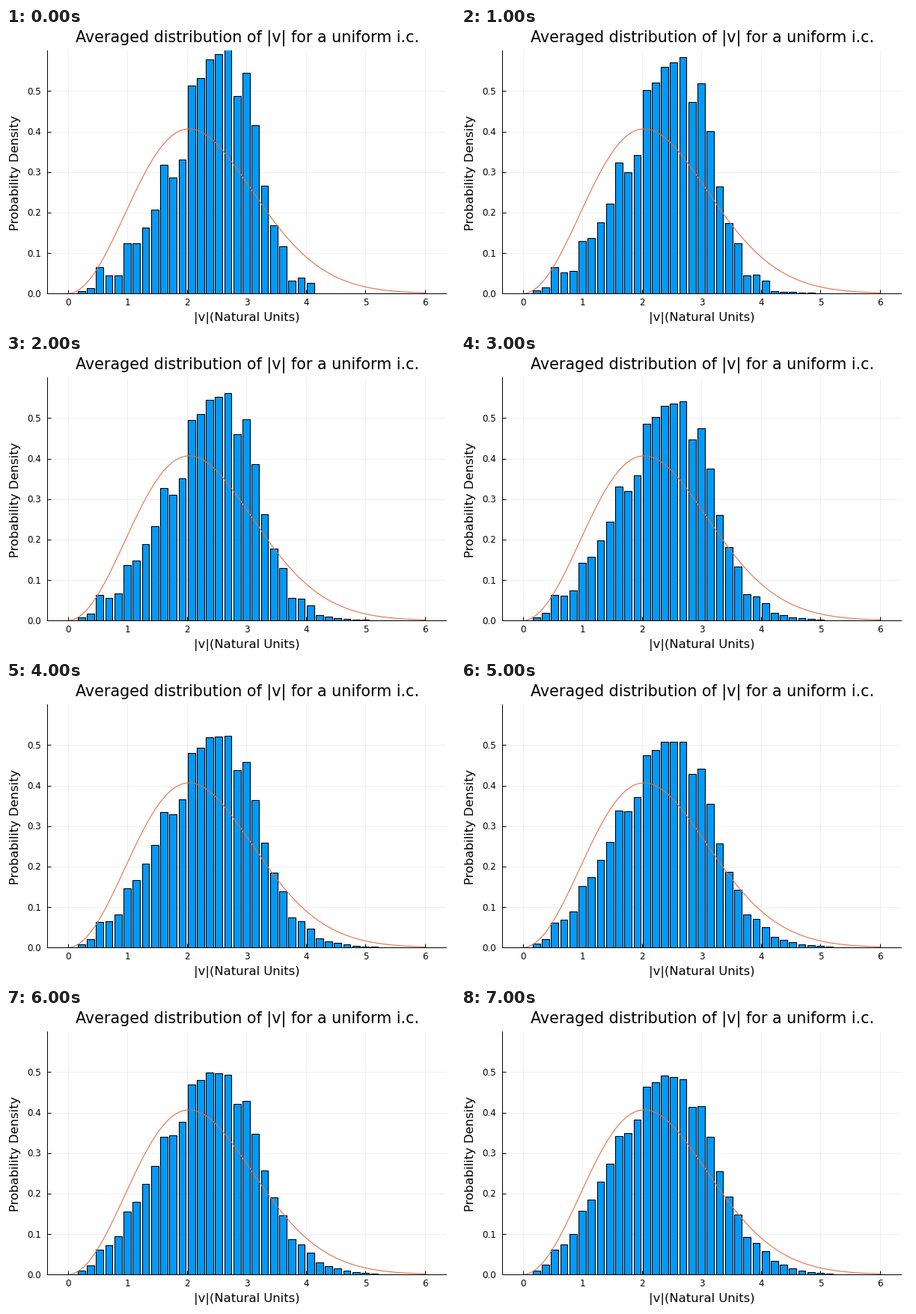
Write a matplotlib script that moves like this. It is 600 px wide and 400 px high and loops after 8000 ms.

```python
import numpy as np
import matplotlib.pyplot as plt
from matplotlib.animation import FuncAnimation

W, H, DPI = 600, 400, 100
BINS = 39
STEP = 6 / BINS
X0, X_UNIT = 82.55, 79.5     # pixel of v = 0, pixels per unit of v
Y0, Y_UNIT = 355.2, 541.5    # pixel of density 0, pixels per unit
LEFT, RIGHT, TOP = 55.1, 587.9, 30.3

# Particles per bin at the start, and the density of a single particle.
COUNTS = [0, 1, 2, 10, 7, 7, 19, 19, 25, 32, 49, 44, 51, 79,
          82, 89, 91, 94, 75, 84, 64, 41, 26, 18, 5, 6, 4]
PER_COUNT = 0.0065
RATE = 0.13                  # relaxation per second


def pt(px):
    return px * 72 / DPI


def maxwell(v, a=1.443):
    return np.sqrt(2 / np.pi) * v**2 / a**3 * np.exp(-v**2 / (2 * a**2))


centers = (np.arange(BINS) + 0.5) * STEP
start = np.pad(COUNTS, (0, BINS - len(COUNTS))) * PER_COUNT
relaxed = 0.2122 * centers**2 * np.exp(-0.155 * centers**2 - 0.0045 * centers**4)


def heights(t):
    return relaxed + (start - relaxed) * np.exp(-RATE * t)


fig = plt.figure(figsize=(W / DPI, H / DPI), dpi=DPI, facecolor="white")
ax = fig.add_axes([LEFT / W, 1 - Y0 / H, (RIGHT - LEFT) / W, (Y0 - TOP) / H])
ax.set_xlim((LEFT - X0) / X_UNIT, (RIGHT - X0) / X_UNIT)
ax.set_ylim(0, (Y0 - TOP) / Y_UNIT)
ax.set_axisbelow(True)
ax.spines[["top", "right"]].set_visible(False)
ax.spines[["left", "bottom"]].set_linewidth(pt(1))

x_ticks = np.arange(7)
y_ticks = np.arange(6) / 10
ax.set_xticks(x_ticks)
ax.set_yticks(y_ticks)
ax.tick_params(direction="in", length=pt(5), width=pt(1),
               labelbottom=False, labelleft=False)
ax.grid(color="black", alpha=0.06, linewidth=pt(1))


def label(x, y, text, px, ha="center", **kw):
    fig.text(x / W, 1 - y / H, text, fontsize=pt(px), family="DejaVu Sans",
             ha=ha, va="baseline", **kw)


label(322.7, 18.5, "Averaged distribution of |v| for a uniform i.c.", 20.7)
label(321.5, 392, "|v|(Natural Units)", 16.35)
label(17, 193.5, "Probability Density", 16.4, rotation=90, rotation_mode="anchor")
for v in x_ticks:
    label(X0 + X_UNIT * v + 0.4, 371.3, str(v), 11.9)
for p in y_ticks:
    label(47.3, Y0 - Y_UNIT * p + 4.6, f"{p:.1f}", 11.9, ha="right")

bars = ax.bar(centers, heights(0), width=0.8 * STEP, color="#009AFA",
              edgecolor="black", linewidth=pt(1.1), zorder=2)
speed = np.linspace(0.05, 6, 300)
ax.plot(speed, maxwell(speed), color="#E36F47", linewidth=pt(1.1), zorder=3)


def draw(i):
    for bar, h in zip(bars, heights(i)):
        bar.set_height(h)
    return bars.patches


anim = FuncAnimation(fig, draw, frames=8, interval=1000, repeat=True)
plt.show()
```
